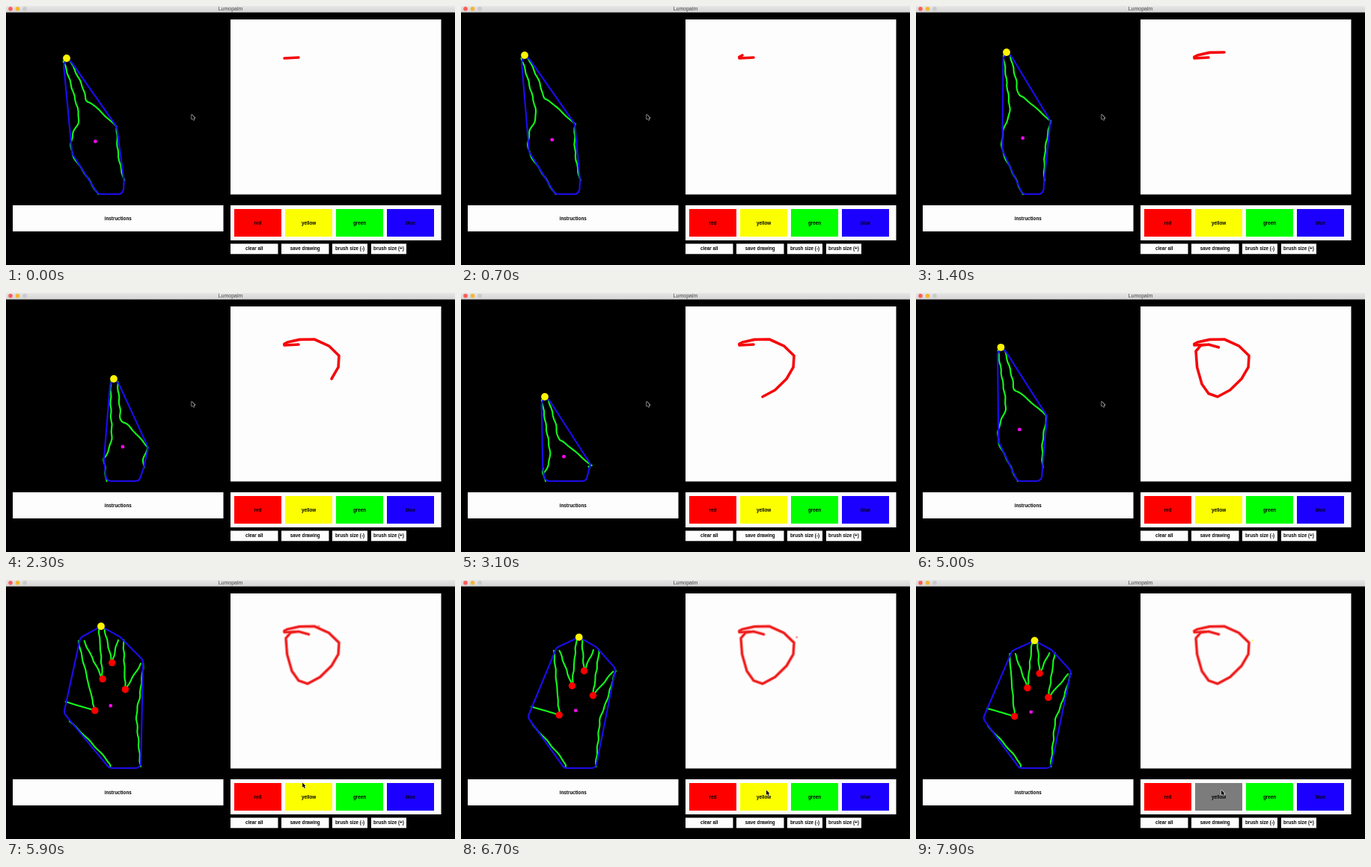
Write an HTML page with a canvas that moves like this. It is 600 px wide and 347 px high and loops after 8000 ms.

```html
<!DOCTYPE html>
<html lang="en">
<head>
<meta charset="utf-8">
<title>Lumopalm</title>
<style>
html, body { margin: 0; width: 100%; height: 100%; overflow: hidden; background: #000; }
canvas { display: block; }
</style>
</head>
<body>
<canvas id="stage" width="600" height="347"></canvas>
<script>
const ctx = document.getElementById('stage').getContext('2d');
const LOOP = 8000, STEP = 285, OPEN_STEP = 18, CLICK = 7400;
const PEN_SHIFT = 291, WRIST_Y = 252;
const PAPER = '#fdfdfd', RED = '#ff0000', YELLOW = '#fcff00', GREEN = '#00ff00', BLUE = '#1c00ff';

// Fingertip path; the tracker samples it twice per key point.
const path = [
  [81, 70], [85, 66], [121, 62], [154, 84], [144, 115], [112, 139], [91, 122], [83, 78],
  [100, 69], [125, 76], [127, 62], [154, 75], [158, 77], [158, 80], [159, 82]
];

const clamp = v => Math.max(0, Math.min(1, v));
const mix = (a, b, k) => a.map((v, i) => v + (b[i] - v) * k);

// Catmull-Rom point at position s, counted in key points.
function spline(points, s) {
  const i = Math.min(Math.floor(s), points.length - 2), t = s - i;
  const [a, b, c, d] = [-1, 0, 1, 2].map(k => points[Math.max(0, Math.min(points.length - 1, i + k))]);
  return b.map((v, n) => v + t / 2 * (c[n] - a[n]
    + t * (2 * a[n] - 5 * v + 4 * c[n] - d[n] + t * (3 * (v - c[n]) + d[n] - a[n]))));
}

const tipAt = step => spline(path, step / 2);

// Pointing hand: turn grows as the finger swings right, drop as it sinks.
function pointingHand([x, y]) {
  const turn = (x - 82) / 62, drop = (y - 62) / 53;
  const at = (dx, dy) => [x + dx, y + dy];
  const knuckle = at(67 - 21 * turn * turn, 92);
  const heel = at(7 - 20 * turn, 131 - 24 * drop);
  const wristLeft = [126 + 26 * turn - 18 * drop, WRIST_Y];
  const wristRight = [157 + 21 * turn, WRIST_Y];
  const side = [wristRight[0] + 1 + 5 * turn * drop, 234];
  const hollow = mix(knuckle, side, 0.5);
  hollow[0] -= 3;
  return {
    palm: at(38 - 26 * turn, 115 - 24 * drop),
    joints: [],
    hull: [at(-4.5, 3), heel, wristLeft, wristRight, side, knuckle, at(5, 3)],
    sides: [
      [at(-4, 4), at(7 - 11 * turn, 40), at(16 - 19 * turn, 80), at(7.5 - 18 * turn, 103),
        heel, mix(heel, wristLeft, 0.5), wristLeft],
      [at(5, 4), at(21 - 13 * turn, 38), at(26 - 16 * turn, 56), at(36 - 16 * turn, 63), knuckle],
      [knuckle, hollow, side]
    ]
  };
}

// Open hand: the outline runs from finger to finger through the valleys between them.
function openHand(tip) {
  const rest = [157, 77];
  const thumb = [89, 184], wristLeft = [138, WRIST_Y], wristRight = [180, WRIST_Y];
  const fingers = [[127, 91], rest, [180, 90], [206, 119]];
  const valleys = [[131, 181], [148, 142], [164, 122], [176, 155]];
  const edge = ([x, y], dx) => [x + dx, y + 4];
  const sides = valleys.map((valley, i) => {
    const from = i ? edge(fingers[i - 1], 4) : [94, 170];
    const to = edge(fingers[i], -3.5);
    return [from, mix(from, valley, 0.85), valley, mix(valley, to, 0.15), to];
  });
  sides.push(
    [[95, 194], [118, 219], [138, 244], [139, 251]],
    [[206, 122], [194, 163], [186, 185], [183, 215], [180, 250]]
  );
  // The fingertip pulls the hand along while the wrist stays on the lower edge.
  const pull = ([x, y]) => {
    const weight = clamp((WRIST_Y - y) / (WRIST_Y - rest[1]));
    return [x + weight * (tip[0] - rest[0]), y + weight * (tip[1] - rest[1])];
  };
  return {
    palm: pull([153, 175]),
    joints: valleys.map(pull),
    hull: [thumb, ...fingers, wristRight, wristLeft].map(pull),
    sides: sides.map(side => side.map(pull))
  };
}

function rect(x, y, w, h, color) {
  ctx.fillStyle = color;
  ctx.fillRect(x, y, w, h);
}

function dot([x, y], r, color) {
  ctx.fillStyle = color;
  ctx.beginPath();
  ctx.arc(x, y, r, 0, Math.PI * 2);
  ctx.fill();
}

function stroke(color, width) {
  ctx.strokeStyle = color;
  ctx.lineWidth = width;
  ctx.stroke();
}

function line(points, color, width) {
  ctx.beginPath();
  points.forEach(p => ctx.lineTo(...p));
  stroke(color, width);
}

// A camera outline: a spline with a slight tremble.
function outline(points, color, width) {
  const parts = 8, samples = [];
  for (let i = 0; i <= (points.length - 1) * parts; i++) {
    const [x, y] = spline(points, i / parts);
    samples.push([x + 0.6 * Math.sin(y * 0.33), y]);
  }
  line(samples, color, width);
}

function roundedLoop(points, radius, color, width) {
  ctx.beginPath();
  ctx.moveTo(...mix(points[points.length - 1], points[0], 0.5));
  points.forEach((p, i) => ctx.arcTo(...p, ...points[(i + 1) % points.length], radius));
  ctx.closePath();
  stroke(color, width);
}

function label(text, x, y, font = 'bold 6.3px', color = '#000') {
  ctx.font = `${font} "Liberation Sans", Arial, sans-serif`;
  ctx.fillStyle = color;
  ctx.fillText(text, x, y);
}

function button(text, x, y, w, h, color = PAPER) {
  rect(x, y, w, h, color);
  label(text, x + w / 2, y + h / 2 + 0.3);
}

function drawWindow(time) {
  rect(0, 0, 600, 347, '#000');
  const bar = ctx.createLinearGradient(0, 0, 0, 9);
  bar.addColorStop(0, '#e6e6e6');
  bar.addColorStop(1, '#d4d4d4');
  rect(0, 0, 600, 8.6, bar);
  ['#fc5b57', '#f5b62e', '#cacaca'].forEach((c, i) => dot([6 + i * 9.5, 3.8], 2.8, c));
  label('Lumopalm', 300, 4.3, '7px', '#444');

  rect(300, 18, 281.5, 234.5, PAPER);
  button('instructions', 9, 267, 281.5, 35);
  rect(300, 267, 281.5, 47, PAPER);
  const yellow = time >= CLICK ? '#7c7c7c' : YELLOW;
  [['red', RED], ['yellow', yellow], ['green', GREEN], ['blue', BLUE]]
    .forEach(([name, color], i) => button(name, 305 + i * 68, 272, 63, 37, color));
  [['clear all', 300, 63.5], ['save drawing', 368, 63.5], ['brush size (-)', 436, 47], ['brush size (+)', 488, 47]]
    .forEach(([name, x, w]) => button(name, x, 318.5, w, 13.8));
}

function drawSketch(time, step) {
  const toPaper = ([x, y]) => [x + PEN_SHIFT, y];
  const sketch = [[391, 69]];
  for (let i = 0; i <= Math.min(step, OPEN_STEP - 1); i++) sketch.push(toPaper(tipAt(i)));
  if (step < OPEN_STEP) return line(sketch, '#f5080a', 3.6);
  line(sketch, 'rgba(255, 30, 30, 0.4)', 4.8);
  line(sketch, '#ee1c1c', 2.7);
  dot(toPaper(tipAt(step)), 1.7, time >= CLICK ? 'rgba(255, 255, 0, 0.4)' : 'rgba(255, 0, 0, 0.35)');
}

function drawHand(step) {
  const tip = tipAt(step);
  const hand = step < OPEN_STEP ? pointingHand(tip) : openHand(tip);
  hand.sides.forEach(side => outline(side, '#14fa1c', 2.1));
  roundedLoop(hand.hull, 7, '#1c0ce8', 2.2);
  hand.joints.forEach(joint => dot(joint, 4.7, RED));
  dot(hand.palm, 2.4, '#f808f0');
  dot(tip, 4.9, '#fff500');
}

function drawPointer(time) {
  const k = clamp((time - 5400) / 600), ease = k * k * (3 - 2 * k);
  ctx.save();
  ctx.translate(248 + 160 * ease, 145.3 + 136.2 * ease);
  ctx.beginPath();
  [[0, 0], [0, 6.6], [1.5, 5.2], [2.6, 7.8], [3.7, 7.3], [2.6, 4.9], [4.5, 4.8]].forEach(p => ctx.lineTo(...p));
  ctx.closePath();
  stroke('#fff', 0.9);
  ctx.fillStyle = '#000';
  ctx.fill();
  ctx.restore();
}

function draw(now) {
  const time = Math.floor(now % LOOP / 100) * 100;
  const step = Math.floor(time / STEP);
  ctx.textAlign = 'center';
  ctx.textBaseline = 'middle';
  ctx.lineCap = ctx.lineJoin = 'round';
  drawWindow(time);
  drawSketch(time, step);
  drawHand(step);
  drawPointer(time);
}

const start = performance.now();
function tick() {
  draw(performance.now() - start);
  requestAnimationFrame(tick);
}
tick();
</script>
</body>
</html>
```
